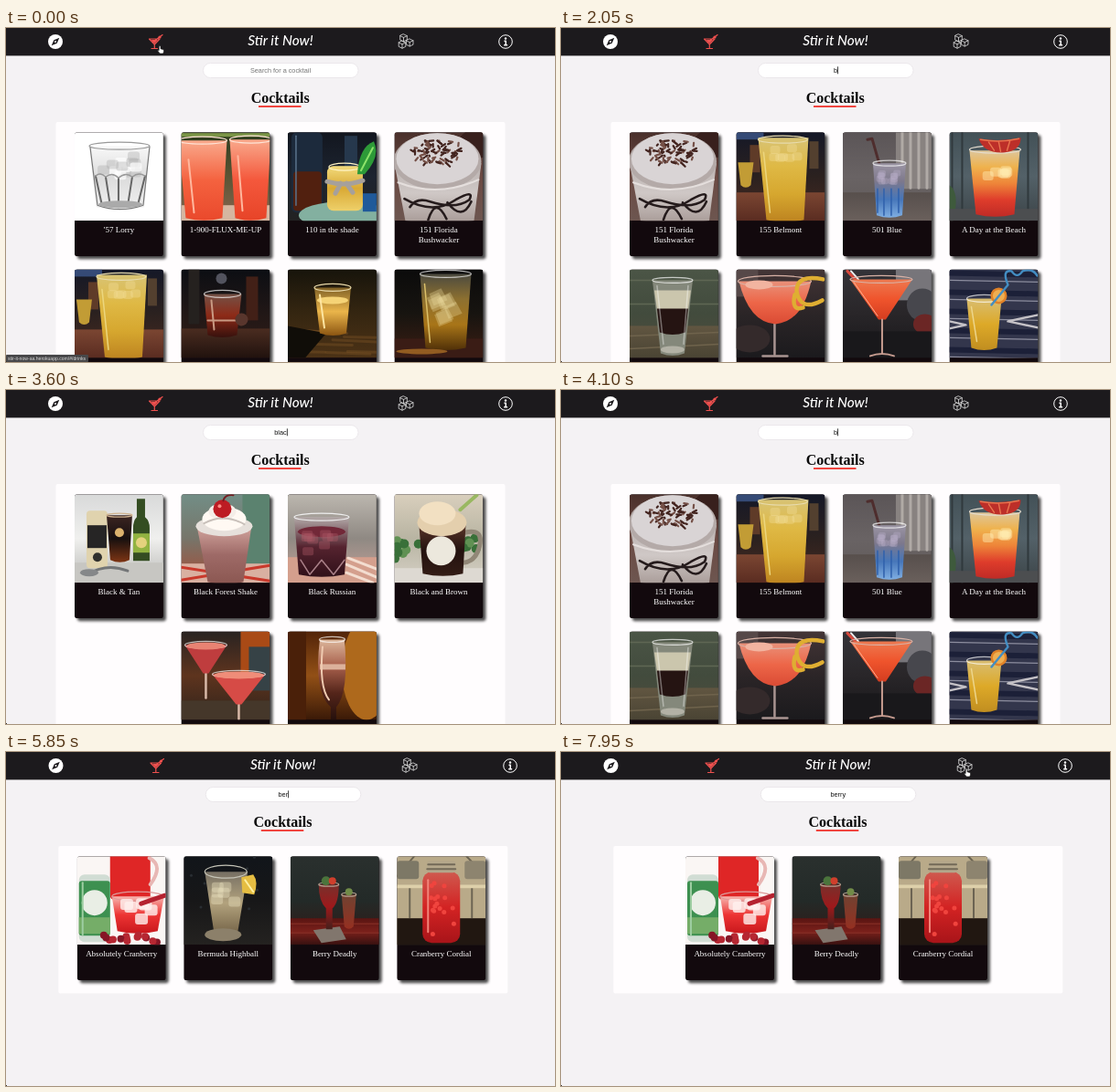
Recreate the animation shown at these times as an HTML page. Size 600 by 366 pixels, loop 8000 ms.

```html
<!DOCTYPE html>
<html lang="en">
<head>
<meta charset="utf-8">
<title>Stir it Now!</title>
<style>
html, body { margin: 0; width: 100%; height: 100%; overflow: hidden; background: #f4f2f4; }
svg { display: block; width: 100%; height: 100%; }
text { text-anchor: middle; }
.sans { font-family: "Liberation Sans", Arial, sans-serif; font-size: 7.3px; }
.label { font: 9px "Liberation Serif", serif; fill: #fff; }
.heading { font: bold 16px "Liberation Serif", serif; fill: #0a0a0a; }
.brand { font: italic 500 15.4px Lato, sans-serif; fill: #fff; }
</style>
</head>
<body>
<svg id="stage" viewBox="0 0 600 366"></svg>
<script>
const LOOP = 8000, CARD = 97, PITCH = 116.5;
const stage = document.getElementById('stage');
let defs = '', gradCount = 0;

// Shape helpers
const attrs = o => Object.entries(o).map(([k, v]) => `${k}="${v}"`).join(' ');
const rect = (x, y, width, height, fill, rx = 0, more = {}) =>
  `<rect ${attrs({ x, y, width, height, fill, rx, ...more })}/>`;
const oval = (cx, cy, rx, ry, fill, more = {}) => `<ellipse ${attrs({ cx, cy, rx, ry, fill, ...more })}/>`;
const dot = (x, y, r, fill) => oval(x, y, r, r, fill);
const shape = (d, fill) => `<path d="${d}" fill="${fill}"/>`;
const line = (d, stroke, w = 1) =>
  `<path d="${d}" fill="none" stroke="${stroke}" stroke-width="${w}" stroke-linecap="round" stroke-linejoin="round"/>`;
const cup = (l, r, top, bl, br, bottom, fill) =>
  shape(`M${l} ${top}H${r}L${br} ${bottom}Q${(bl + br) / 2} ${bottom + 5} ${bl} ${bottom}Z`, fill);
const rim = (x, y, rx, ry, color = '#ffffffb0') => oval(x, y, rx, ry, 'none', { stroke: color, 'stroke-width': 1.2 });
const bg = fill => rect(0, 0, CARD, CARD, fill);
const fade = (...colors) => {
  const id = 'g' + gradCount++;
  const stops = colors.map((c, i) => `<stop offset="${i / (colors.length - 1)}" stop-color="${c}"/>`).join('');
  defs += `<linearGradient id="${id}" x2="0" y2="1">${stops}</linearGradient>`;
  return `url(#${id})`;
};
const martini = (x, y, w, h, foot, fill) =>
  line(`M${x} ${y + h}V${foot}`, '#d9b9a8', 2.5) +
  shape(`M${x - w} ${y}H${x + w}L${x + 3} ${y + h}H${x - 3}Z`, fill) + rim(x, y, w, 4);
const seeded = seed => () => (seed = seed * 16807 % 2147483647) / 2147483647;
const scatter = (n, seed, draw) => {
  const rnd = seeded(seed);
  for (let i = 0; i < 5; i++) rnd();
  return Array.from({ length: n }, () => draw(rnd)).join('');
};

const photos = {
  lorry: bg('#fff') + cup(16, 82, 15, 24, 76, 82, fade('#f8f8f8', '#dcdcdc', '#f0f0f0')) +
    scatter(14, 7, r => rect(23 + r() * 40, 20 + r() * 24, 13, 10, r() > .5 ? '#ffffffb0' : '#aaaaaa60', 3)) +
    line('M17 16L25 80Q49 89 75 80L82 16', '#777', 1.2) + rim(49, 15, 33, 4, '#999') +
    line('M23 48L30 80M34 49L39 81M48 50V82M63 49L58 81M77 48L69 80', '#666', 2) +
    line('M23 48Q28 43 34 49Q41 43 48 50Q56 43 63 49Q70 43 77 48', '#999', 1.4) + oval(50, 79, 24, 4, '#aaa'),
  flux: bg(fade('#2b3a1c', '#5a5434', '#8a6650')) + rect(0, 1, 97, 4, '#7b9547') + rect(0, 80, 97, 17, '#d5b6a0') +
    cup(-3, 50, 9, 5, 45, 94, fade('#f9a98c', '#f4623f', '#ea492c')) + cup(53, 98, 8, 59, 93, 94, fade('#f9a98c', '#f4583c', '#e74428')) +
    rim(23, 9, 27, 4, '#ffe5d8') + rim(76, 8, 23, 4, '#ffe5d8') + line('M8 30L14 88M62 26L67 86', '#ffb79e', 2),
  shade: bg(fade('#12161f', '#1d2430', '#222')) + rect(4, 0, 34, 88, '#1c2a3c', 6) + rect(6, 43, 31, 43, '#51200f', 4) +
    line('M9 4V80', '#5b738c', 1.5) + rect(62, 4, 14, 40, '#26384d') + oval(62, 91, 50, 15, '#83b0a0') +
    rect(82, 67, 15, 20, '#205a9a') + rect(43, 37, 39, 49, fade('#f2db7e', '#d9a934', '#eed06a'), 7) + rim(62, 38, 17, 4, '#fff4c5') +
    line('M43 54Q62 60 82 53M58 56L52 67M64 56L71 66', '#a6a09c', 5) +
    shape('M76 46Q78 16 94 10Q102 26 84 46Z', '#2d9a38') + line('M80 42L93 17', '#8ce36a', 2),
  bushwacker: bg(fade('#4a302b', '#6b4a43', '#6d5650')) + oval(92, 12, 22, 16, '#38201d') +
    cup(0, 95, 34, 12, 87, 97, fade('#b9b0ae', '#cfc8c6', '#a89b97')) + oval(47, 32, 48, 31, '#b4aaa8') + oval(47, 29, 45, 28, '#d9d4d5') +
    scatter(75, 31, r => {
      const a = r() * 6.3, d = Math.sqrt(r()), x = 47 + 27 * d * Math.cos(a), y = 22 + 14 * d * Math.sin(a);
      return line(`M${x} ${y}l${r() * 10 - 5} ${r() * 8 - 4}`, r() > .4 ? '#43241f' : '#755047', 2.2);
    }) +
    line('M4 55Q48 72 92 52', '#e5dfdd', 2) +
    line('M11 73Q42 91 67 74Q88 62 82 74Q67 85 39 76Q24 71 17 82M37 96Q45 70 57 95M58 77Q74 98 84 76', '#251b1c', 2.6),
  belmont: bg(fade('#151827', '#2b211f', '#4a2b21')) + rect(0, 0, 30, 8, '#354a76') + rect(15, 14, 11, 30, '#5f3b28') +
    rect(80, 10, 10, 30, '#53402f') + rect(0, 66, 97, 31, fade('#7b4632', '#5a2c21')) +
    cup(2, 19, 33, 5, 16, 58, '#c29c35') + cup(24, 79, 6, 33, 74, 96, fade('#d8c374', '#dfb945', '#d6a72f', '#bd8320')) +
    rim(51, 8, 27, 4, '#e8dcae') + line('M30 22L37 88', '#ecd67e', 1.5) +
    scatter(7, 9, r => rect(34 + r() * 28, 12 + r() * 24, 11, 9, '#f4e3a450', 3)),
  ruby: bg(fade('#0c0e13', '#211716', '#321e17')) + rect(0, 65, 97, 32, fade('#4a2c20', '#21120e')) +
    rect(8, 0, 12, 60, '#25211f') + rect(71, 8, 13, 48, '#422017') + dot(44, 10, 6, '#52535e') +
    cup(25, 66, 27, 29, 61, 72, fade('#745247', '#8d2a17', '#38110d')) + rim(45, 27, 20, 4) +
    line('M29 56H62M33 34L36 66', '#c99a83', 2) + dot(66, 55, 7, '#59362d'),
  wood: bg(fade('#17140b', '#352611', '#4c3216')) +
    scatter(8, 5, r => line(`M${r() * 97} ${58 + r() * 35}l${25 + r() * 35} ${r() * 8}`, '#76502475', 3)) +
    shape('M0 62L42 70L19 97H0Z', '#100d08') + cup(29, 69, 20, 35, 64, 70, fade('#806126', '#eab54b', '#8c5612')) +
    rim(49, 20, 20, 4, '#e8d8a8') + oval(49, 34, 17, 4, '#f5d376') + line('M35 28L40 64', '#ffe6a2', 2),
  whisky: bg(fade('#0b0b0b', '#171410', '#3c1e13')) + rect(0, 76, 97, 21, '#3a1c15') +
    cup(28, 84, 5, 34, 78, 86, fade('#4b4a3f', '#8d7030', '#a87518', '#513108')) + rim(56, 5, 28, 4) +
    scatter(8, 61, r => shape(`M${35 + r() * 28} ${18 + r() * 34}l13 -6l7 13l-15 6Z`, '#eddda150')) +
    line('M33 16L39 80', '#dbbf68', 1.5) + oval(30, 90, 28, 3, '#925c21'),
  blue: bg(fade('#5b5557', '#696364', '#5f5958')) + rect(58, 0, 39, 62, '#888280') +
    line('M65 0V61M74 0V61M83 0V61M92 0V61', '#b0aaa6', 3) +
    rect(0, 66, 97, 31, fade('#574f4c', '#6a605c')) + line('M27 8L32 7L42 42', '#4e2d2d', 3) +
    cup(33, 69, 34, 37, 65, 91, fade('#9b95a4', '#7d788c', '#4676b9', '#7faee2')) + rim(51, 34, 18, 3) +
    line('M38 62V88M45 62V91M53 62V91M61 62V88', '#2f60ac', 1.5) +
    scatter(12, 4, r => rect(36 + r() * 22, 38 + r() * 18, 8, 7, '#b8aec760', 2)),
  beach: bg(fade('#435157', '#536168', '#3c4448')) + line('M3 0V97M14 0V97M86 0V97', '#30393d', 2) + shape('M0 58Q12 66 4 97H0Z', '#3e5a3c') +
    rect(0, 84, 97, 13, '#4c4e50') +
    cup(22, 77, 20, 29, 71, 90, fade('#ddc69c', '#efb24d', '#ee8539', '#de3c2b', '#bf2b26')) + rim(50, 19, 28, 4, '#e5ddd0') +
    shape('M32 7Q55 11 78 6Q78 20 61 22Q38 24 32 7Z', '#bd2f29') + line('M34 8Q55 12 76 7M54 11L56 21M43 11L49 20M66 10L63 20', '#e9754f', 1.4) +
    scatter(6, 13, r => rect(32 + r() * 28, 28 + r() * 15, 12, 10, '#fff0b670', 3)),
  layers: bg(fade('#4b5546', '#424b3d', '#4f4c3b')) + line('M0 12H97M0 38H97', '#5f6754', 1.5) +
    rect(0, 62, 97, 35, fade('#615641', '#4a4434')) + line('M0 73L97 69M0 87L97 82', '#6f634c', 1.5) +
    cup(25, 69, 12, 34, 60, 92, '#84887b') + cup(27, 67, 23, 30, 64, 44, '#cbc6ad') + cup(30, 64, 43, 33, 61, 69, '#251412') +
    rim(47, 12, 22, 3) + line('M30 18L37 82M64 18L59 82', '#ffffff60', 1.5) + oval(47, 88, 13, 4, '#b2b1a5'),
  coupe: bg(fade('#443536', '#2b2527', '#1b1a1d')) + rect(0, 0, 24, 30, '#564848') + oval(15, 76, 22, 15, '#342a2b') +
    line('M42 56V93M29 95H56', '#a99491', 2.5) + shape('M3 13H82Q72 58 43 60Q14 58 3 13Z', fade('#e9917a', '#ed6648', '#da4b34')) +
    rim(42, 13, 40, 6, '#d9b2a6') + line('M95 11Q66 5 66 24Q70 47 94 34M64 28Q60 46 73 42', '#dfae32', 4.5) + oval(25, 17, 15, 5, '#f2b4a0'),
  orange: bg(fade('#343338', '#292629', '#171619')) + rect(58, 0, 39, 34, '#77757a') + oval(87, 39, 17, 18, '#47474d') + oval(90, 60, 13, 11, '#6b2625') +
    rect(0, 68, 97, 29, '#19181b') + line('M5 2L27 25', '#d7493d', 3) + line('M9 2L17 11', '#eee', 2) +
    shape('M8 11H76L47 55H39Z', fade('#ed7950', '#ef542c', '#d43d20')) + rim(42, 11, 34, 4, '#d9b2a6') +
    line('M43 55V92M30 95Q43 90 56 95', '#c79c90', 2) + line('M12 14L38 51', '#ffb090', 1),
  stripe: bg('#33364c') +
    [4, 25, 46, 67, 88].map(y => line(`M0 ${y}L97 ${y + 2}`, '#1c2038', 6) + line(`M0 ${y + 8}L97 ${y + 10}`, '#8c8d9e', 1.3)).join('') +
    line('M0 57L18 61L0 65M97 50L64 57L97 64', '#c4c1c6', 2.5) +
    cup(19, 57, 32, 24, 52, 86, fade('#d8bd72', '#dda928', '#c18e20')) + rim(38, 32, 19, 4) + dot(54, 29, 9, '#df8127') + dot(54, 29, 6.5, '#eeae51') +
    line('M46 39L64 17Q57 0 68 2Q74 11 80 2Q91 -2 96 7', '#438dc2', 2.4) + line('M24 41L30 79', '#edd58a', 1.5),
  tan: bg(fade('#d8d9d9', '#f0f0ee', '#b8b8b5')) + rect(0, 75, 97, 22, '#c7c6c2') +
    rect(13, 18, 23, 63, '#e0d3ae', 4) + rect(14, 34, 21, 25, '#262525') + dot(25, 69, 5, '#30302d') +
    cup(35, 63, 23, 39, 60, 72, fade('#3c2522', '#17100f', '#7e3514')) + rim(49, 23, 14, 2, '#d0b390') + dot(49, 42, 5, '#dbb36e') +
    shape('M68 5H77V25Q82 29 82 37V73H64V37Q64 29 68 25Z', '#344d22') + rect(64, 43, 18, 21, '#92b341') + dot(73, 53, 6, '#e4d27d') +
    line('M14 88Q35 75 58 84', '#737577', 3) + oval(16, 86, 10, 4, '#858789'),
  forest: bg(fade('#728e86', '#77756a', '#a54c37')) + rect(67, 0, 30, 97, '#5b826f') + rect(0, 76, 97, 21, '#d9b0a1') +
    line('M0 80L97 95M0 94L97 78', '#c9392c', 3) + cup(17, 77, 34, 29, 68, 96, fade('#d4a7a0', '#9e6a67', '#8b5751')) +
    oval(47, 35, 31, 11, '#e6e0db') + oval(47, 27, 24, 13, '#fff9f3') + oval(45, 19, 15, 9, '#f5eee8') + line('M25 32Q46 20 69 33', '#c8c0ba', 2) +
    dot(45, 16, 10, '#bd1c23') + dot(42, 13, 2, '#ff8c84') + line('M46 7Q48 0 57 1', '#751c20', 2),
  russian: bg(fade('#bcb7af', '#8f8983', '#c7a299')) + rect(0, 69, 97, 28, '#d49f8d') +
    line('M66 70L97 82M64 77L97 91M64 86L93 97', '#f3ddd0', 3) + cup(7, 67, 25, 12, 62, 88, fade('#b3aaa9', '#55232f', '#301019')) +
    rim(37, 25, 30, 4, '#eee') + oval(37, 41, 26, 6, '#722838') +
    scatter(9, 3, r => rect(14 + r() * 36, 39 + r() * 25, 12, 9, '#ad586660', 2)) + line('M14 72L24 88L37 72L50 88L62 72', '#aa8088', 1.5),
  brown: bg(fade('#d9cfbd', '#b8b4a2', '#d6d1c6')) +
    scatter(24, 17, r => dot(r() * 97, 48 + r() * 25, 5, r() > .4 ? '#397039' : '#609153')) + rect(0, 81, 97, 16, '#ddd9d2') +
    line('M77 42Q98 37 93 57Q89 74 75 75', '#918777', 5) + line('M72 17L90 1', '#99b861', 4) +
    cup(27, 78, 34, 31, 75, 87, fade('#583428', '#24120f', '#321c15')) + oval(52, 31, 27, 15, '#e4cfad') + oval(47, 21, 20, 13, '#f2e0c2') +
    dot(51, 62, 16, '#ece8dd'),
  pair: bg(fade('#292321', '#5e341e', '#30231b')) + rect(65, 0, 32, 45, '#a94a16') + rect(74, 17, 23, 48, '#364246') + rect(0, 76, 97, 21, '#45372a') +
    martini(27, 15, 23, 31, 73, '#bf3d3e') + martini(63, 47, 29, 33, 96, '#d64b46') + oval(27, 16, 21, 4, '#e88373') + oval(63, 48, 27, 4, '#ef8d79'),
  flute: bg(fade('#522409', '#925016', '#3a1907')) + oval(86, 42, 27, 55, '#ae691c') + rect(0, 0, 20, 97, '#4a2009') +
    shape('M35 9H62Q67 67 53 83V97H47V83Q28 66 35 9Z', fade('#dcb79c', '#a8604c', '#54251a', '#26100c')) +
    rect(35, 36, 28, 6, '#dcb29c') + rim(48.5, 9, 14, 3) + line('M38 17Q34 61 45 75', '#f0cbb1', 2),
  absolutely: bg('#faf6f4') + rect(36, -4, 44, 52, '#df2626', 5) + line('M79 2Q95 10 80 31', '#e8b7b4', 4) +
    cup(38, 95, 44, 44, 88, 82, fade('#f7b6b0', '#ed3433', '#c9181d')) + rim(66, 44, 28, 5, '#d99') +
    scatter(6, 21, r => rect(43 + r() * 34, 45 + r() * 18, 14, 12, '#fff2efcc', 3)) +
    rect(2, 20, 34, 74, '#d1ddd4', 6) + rect(2, 27, 34, 60, '#3d9050', 3) + rect(2, 67, 34, 18, '#75ad68') + dot(19, 51, 14, '#e9eee5') + line('M6 29V86', '#9dcda1', 2) +
    scatter(14, 8, r => dot(25 + r() * 67, 86 + r() * 9, 4, r() > .4 ? '#861626' : '#b62732')) + line('M70 52L96 43', '#b52230', 5),
  bermuda: bg(fade('#11151a', '#171718', '#242220')) + scatter(12, 11, r => dot(r() * 97, r() * 97, 1.5, '#282d32')) +
    cup(23, 70, 17, 33, 59, 83, fade('#777064', '#b2a27d', '#756448')) + rim(46, 17, 23, 7, '#c5c4b7') +
    scatter(6, 2, r => rect(29 + r() * 23, 26 + r() * 24, 13, 11, '#e3dbb970', 3)) + oval(43, 86, 20, 7, '#8c806a') +
    shape('M63 23L76 20Q82 28 77 42L64 40Z', '#e5bd42') + line('M67 26L76 39', '#fff0a2', 2),
  deadly: bg(fade('#2a302e', '#232a28', '#351713')) + rect(0, 68, 97, 29, fade('#591512', '#7a201b', '#371110')) +
    line('M0 74H97M0 84H97', '#8b3228', 1) + shape('M25 81L54 77L61 91L34 95Z', '#81766d') +
    shape('M31 31H53Q53 51 46 57V80H39V57Q31 49 31 31Z', fade('#78302c', '#9d191b', '#44201c')) + cup(56, 72, 42, 59, 69, 77, fade('#704231', '#953021')) +
    rim(42, 31, 11, 2, '#b5a090') + rim(64, 42, 8, 2, '#b5a090') + dot(39, 27, 5, '#4b743c') + dot(46, 27, 4, '#cf3f2c') + dot(64, 39, 4, '#718b48'),
  cordial: bg('#b9aa89') + line('M0 32H97M19 0L0 22M76 0L97 22M14 32V67M82 32V67', '#6c6453', 2) + rect(0, 5, 24, 20, '#7d7866', 3) +
    rect(74, 5, 23, 20, '#8d846f', 3) + rect(0, 31, 97, 4, '#ded0aa') + rect(0, 68, 97, 29, '#211711') +
    rect(28, 17, 41, 78, fade('#cf5a4f', '#d32323', '#a81419'), 10) + rect(33, 5, 31, 13, '#b4a78b', 3) + line('M34 9H63M33 14H64', '#736a58', 2) +
    line('M34 26V83', '#f2857a', 2) + scatter(16, 6, r => dot(36 + r() * 27, 28 + r() * 58, 2.5, '#f0443e'))
};

const titles = {
  lorry: "'57 Lorry", flux: '1-900-FLUX-ME-UP', shade: '110 in the shade', bushwacker: '151 Florida|Bushwacker',
  belmont: '155 Belmont', blue: '501 Blue', beach: 'A Day at the Beach', tan: 'Black &amp; Tan',
  forest: 'Black Forest Shake', russian: 'Black Russian', brown: 'Black and Brown',
  absolutely: 'Absolutely Cranberry', bermuda: 'Bermuda Highball', deadly: 'Berry Deadly', cordial: 'Cranberry Cordial'
};
const grids = {
  all: 'lorry flux shade bushwacker belmont ruby wood whisky',
  b: 'bushwacker belmont blue beach layers coupe orange stripe',
  black: 'tan forest russian brown pair flute',
  be: 'belmont beach absolutely bermuda deadly cordial',
  ber: 'absolutely bermuda deadly cordial',
  berry: 'absolutely deadly cordial'
};

const card = (name, x, y) => `<g transform="translate(${x} ${y})">
  ${rect(3, 3, CARD, 136, '#000', 3, { opacity: .7, filter: 'url(#soft)' })}
  <g clip-path="url(#cardClip)">${rect(0, 0, CARD, 136, '#12090d')}<use href="#${name}"/></g>
  ${(titles[name] || '').split('|').map((t, i) => `<text class="label" x="48.5" y="${109.5 + i * 11.7}">${t}</text>`).join('')}</g>`;

const buildGrid = ([id, list]) => {
  const names = list.split(' ');
  const cards = names.map((name, i) => {
    const row = Math.floor(i / 4), count = Math.min(4, names.length - row * 4);
    return card(name, 298.2 - (count * PITCH - 19.5) / 2 + i % 4 * PITCH, 114.2 + row * 150.2);
  });
  return `<g id="grid-${id}">${rect(54.5, 103, 491, names.length > 4 ? 270 : 161.5, '#fffdfe', 2)}${cards.join('')}</g>`;
};

const cube = (x, y) => line(`M${x} ${y - 4}l3.8 1.8v4.4l-3.8 1.8l-3.8 -1.8v-4.4ZM${x - 3.8} ${y - 2.2}l3.8 1.8l3.8 -1.8M${x} ${y - .4}v4.4`, '#ddd', .8);
const icons = [
  [54, dot(0, 15, 8, '#fff') + shape('M4.3 10.7L1.7 16.7L-4.3 19.3L-1.7 13.3Z', '#1c1a1d') + dot(0, 15, 1, '#fff')],
  [163, line('M-6.5 12H5L-.7 18ZM-.7 18V22.5M-4 22.5H2.5M-2 15L8 7.5', '#ef514f', 1.2) + shape('M-4.5 13H3L-.7 17Z', '#ef514f') + dot(5, 10, 1.6, '#ef514f')],
  [300, '<text class="brand" y="18.5">Stir it Now!</text>'],
  [437, cube(-2.5, 10.8) + cube(-4, 18.2) + cube(4.2, 16)],
  [546, oval(0, 15, 7.3, 7.3, 'none', { stroke: '#fff', 'stroke-width': 1 }) + dot(0, 11.5, 1.2, '#fff') + line('M-1 14.2H.2V18.6M-1.3 18.8H1.5', '#fff', 1.5)]
];

const symbols = Object.entries(photos).map(([id, art]) => `<symbol id="${id}" width="97" height="97" viewBox="0 0 97 97">${art}</symbol>`).join('');

stage.innerHTML = `<defs>${defs}${symbols}
  <filter id="soft" x="-10%" y="-10%" width="120%" height="120%"><feGaussianBlur stdDeviation="1.5"/></filter>
  <clipPath id="cardClip">${rect(0, 0, CARD, 136, '#000', 3)}</clipPath></defs>
  ${rect(0, 0, 600, 366, '#f4f2f4')}${rect(0, 0, 600, 30.4, '#1c1a1d')}
  ${icons.map(([x, art]) => `<g class="icon" data-x="${x}">${art}</g>`).join('')}
  <g id="page">
    ${rect(215.5, 38.5, 169.5, 16, '#fff', 8, { stroke: '#e7e4e8', 'stroke-width': .8 })}
    <text id="hint" class="sans" x="300" y="49">Search for a cocktail</text>
    <text id="query" class="sans" x="300" y="49" fill="#111"></text>
    ${rect(0, 42.3, .8, 8, '#111', 0, { id: 'caret' })}
    <text class="heading" x="299.7" y="82">Cocktails</text>${rect(276, 85, 46.5, 2, '#f0453f')}
    ${Object.entries(grids).map(buildGrid).join('')}
  </g>
  <g id="status">${rect(0, 358, 90, 8, '#48484a', 1)}
    <text class="sans" x="44.5" y="364" fill="#ddd" style="font-size:5.1px">stir-it-now-aa.herokuapp.com/#/drinks</text></g>
  ${rect(0, 365, 1, 1, '#333')}
  <g id="cursor">
    <g id="hand"><path d="M-.8 0Q.4 -1 1 .2V2.8L4.4 3.7Q5 6 3.7 8H.2L-2.3 4.9Q-2 3.8 -.8 4.6Z" fill="#fff" stroke="#111" stroke-width=".6"/></g>
    <g id="arrow"><path d="M0 0V8L2 6.2L3.3 9L4.6 8.4L3.3 5.7H6Z" fill="#111" stroke="#fff" stroke-width=".6"/></g>
    <g id="beam">${line('M-1.2 -3H1.2M0 -3V3M-1.2 3H1.2', '#222', .8)}</g>
  </g>`;

const $ = id => document.getElementById(id);
const show = (el, on) => el.setAttribute('visibility', on ? 'visible' : 'hidden');

// [time, typed text, grid]
const keys = [
  [0, '', 'all'], [1800, 'b', 'b'], [2650, 'bl', 'b'], [2800, 'bla', 'black'], [2950, 'blac', 'black'], [3150, 'black', 'black'],
  [3600, 'blac', 'black'], [3750, 'bla', 'black'], [3900, 'bl', 'b'], [4050, 'b', 'b'],
  [5300, 'be', 'be'], [5550, 'ber', 'ber'], [6150, 'berr', 'berry'], [6400, 'berry', 'berry']
];
// [time, x, y]
const path = [[0, 168, 20], [100, 168, 20], [580, 294, 49], [1800, 294, 49], [6850, 306, 49], [7000, 306, 49], [7600, 443, 19], [LOOP, 443, 19]];
const FOCUS = 600;

function cursorAt(t) {
  const i = path.findIndex((p, n) => n && p[0] > t);
  const [t0, x0, y0] = path[i - 1], [t1, x1, y1] = path[i];
  const u = (t - t0) / (t1 - t0), e = u * u * (3 - 2 * u);
  return [x0 + (x1 - x0) * e, y0 + (y1 - y0) * e];
}

function render(t) {
  const [since, text, grid] = keys.findLast(k => k[0] <= t);
  const wide = grid === 'ber' || grid === 'berry';
  $('page').setAttribute('transform', `translate(${wide ? 2.8 : 0} 0)`);
  document.querySelectorAll('.icon').forEach(el =>
    el.setAttribute('transform', `translate(${el.dataset.x * (wide ? 1.0092 : 1)} 0)`));
  Object.keys(grids).forEach(id => $('grid-' + id).style.display = id === grid ? '' : 'none');

  $('query').textContent = text;
  show($('hint'), !text);
  $('hint').setAttribute('fill', t < FOCUS ? '#757575' : '#cfcfcf');
  $('caret').setAttribute('x', 300.2 + $('query').getComputedTextLength() / 2);
  show($('caret'), t >= FOCUS && (t - Math.max(since, FOCUS)) % 1000 < 500);

  const [x, y] = cursorAt(t);
  const visible = t < 1800 || t >= 6850;
  const kind = y > 38 ? 'beam' : x < 174 || x > 430 ? 'hand' : 'arrow';
  $('cursor').setAttribute('transform', `translate(${x} ${y})`);
  ['hand', 'arrow', 'beam'].forEach(id => show($(id), visible && id === kind));
  show($('status'), t < 350);
}

const start = performance.now();
function tick() {
  render((performance.now() - start) % LOOP);
  requestAnimationFrame(tick);
}
tick();
</script>
</body>
</html>
```
